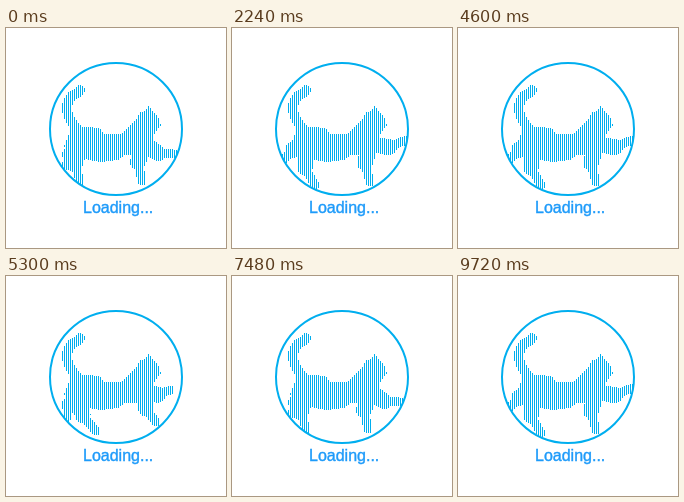
An HTML page for the animation above (9.78 s loop, 220x220 px).

```html
<!DOCTYPE html>
<html>
<head>
<meta charset="utf-8">
<style>
  html, body { margin: 0; width: 100%; height: 100%; overflow: hidden; background: #fff; }
  svg { display: block; width: 100vw; height: 100vh; }
  text { font: 16px "Liberation Sans", Arial, sans-serif; fill: #1e9bfa; stroke: #1e9bfa; stroke-width: .4; }
  #cat { fill: none; stroke: url(#stripes); stroke-linecap: round; shape-rendering: crispEdges; }
</style>
</head>
<body>
<svg viewBox="0 0 220 220">
  <defs>
    <pattern id="stripes" width="2" height="220" patternUnits="userSpaceOnUse">
      <rect width="1" height="220" fill="#00aeef"/>
    </pattern>
    <clipPath id="disc"><circle cx="110" cy="101" r="66"/></clipPath>
  </defs>
  <g clip-path="url(#disc)">
    <g id="cat">
      <path d="M74,62 Q72,65 66,68 Q60,75 61,82 Q62,92 74,104" stroke-width="10"/>
      <path d="M66,97 L79,99 94,100 98,106 116,106 127,94 131,91 134,84 139,83 143,77 146,83
        152,88 155,97 149,105 147,110 148,118 139,127 119,127 112,132 94,134 62,128 58,118 63,106Z"
        fill="url(#stripes)" stroke="none"/>
      <path id="thighs" stroke-width="16"/>
      <path id="shanks" stroke-width="9"/>
    </g>
  </g>
  <circle cx="110" cy="101" r="66" fill="none" stroke="#00aeef" stroke-width="2"/>
  <text x="77" y="185">Loading...</text>
</svg>
<script>
const LOOP = 9780, TICK = 58.9, LEAD = 18, BEND = 0.15;

// Each paw follows a closed eight-step track; the two legs of a pair are half a track apart
const pairs = [
  { hip: [74, 119], track: [[90, 155], [83, 157], [74, 153], [66, 148], [60, 144], [52, 131], [60, 138], [94, 148]] },
  { hip: [139, 116], track: [[164, 114], [174, 112], [168, 126], [157, 138], [150, 146], [138, 154], [136, 153], [113, 145]] }
];

// The knee sits behind the middle of the line from hip to paw
function knee([hx, hy], [px, py]) {
  return [(hx + px) / 2 - BEND * (py - hy), (hy + py) / 2 + BEND * (px - hx)];
}

function pose(step) {
  let thighs = "", shanks = "";
  for (const { hip, track } of pairs) {
    for (const paw of [track[step], track[step + 4]]) {
      const joint = knee(hip, paw);
      thighs += `M${hip}L${joint}`;
      shanks += `M${joint}L${paw}`;
    }
  }
  document.getElementById("thighs").setAttribute("d", thighs);
  document.getElementById("shanks").setAttribute("d", shanks);
}

// Three pose changes in every five ticks
function draw() {
  const tick = Math.floor((performance.now() % LOOP + LEAD) / TICK);
  const change = Math.floor((tick + 0.5) * 0.6);
  pose((change + 2) % 4);
  requestAnimationFrame(draw);
}
draw();
</script>
</body>
</html>
```
